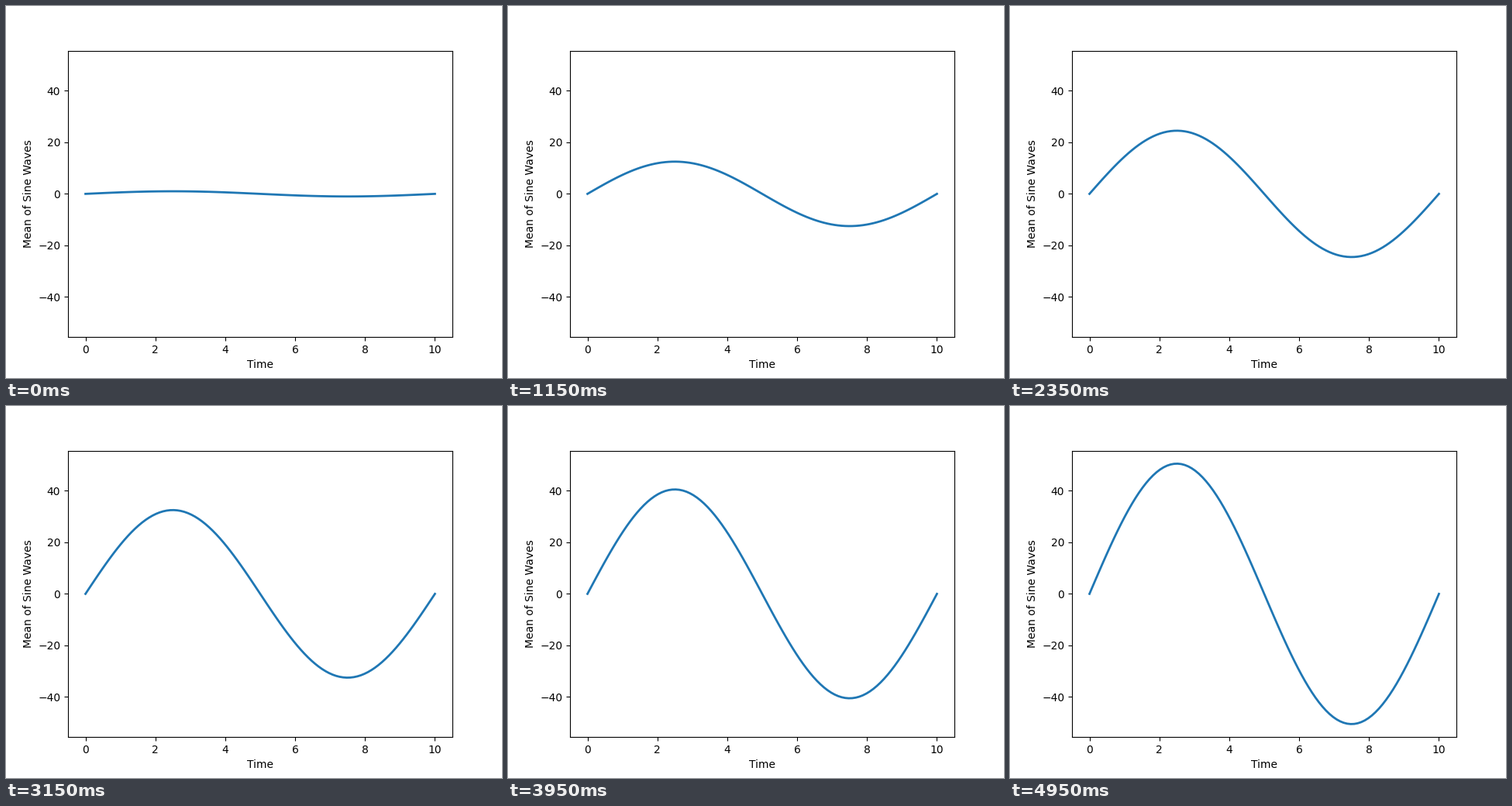
A matplotlib script for the animation above (5 s loop, 640 px wide and 480 px high).

```python
import numpy as np
import matplotlib.pyplot as plt
from matplotlib.animation import FuncAnimation

FRAMES = 100
INTERVAL = 50  # ms
PEAK = 1 + (FRAMES - 1) / 2

time = np.linspace(0, 10, 100)
wave = np.sin(2 * np.pi * time / 10)

fig, ax = plt.subplots(figsize=(6.4, 4.8), dpi=100)
ax.set_xlim(-0.5, 10.5)
ax.set_ylim(-1.1 * PEAK, 1.1 * PEAK)
ax.set_xlabel("Time")
ax.set_ylabel("Mean of Sine Waves")
line, = ax.plot(time, wave, color="#1f77b4", lw=2)


def update(frame):
    """Amplitude grows by half a unit per frame."""
    line.set_ydata((1 + frame / 2) * wave)
    return line,


anim = FuncAnimation(fig, update, frames=FRAMES, interval=INTERVAL,
                     repeat=True, repeat_delay=0)
plt.show()
```
